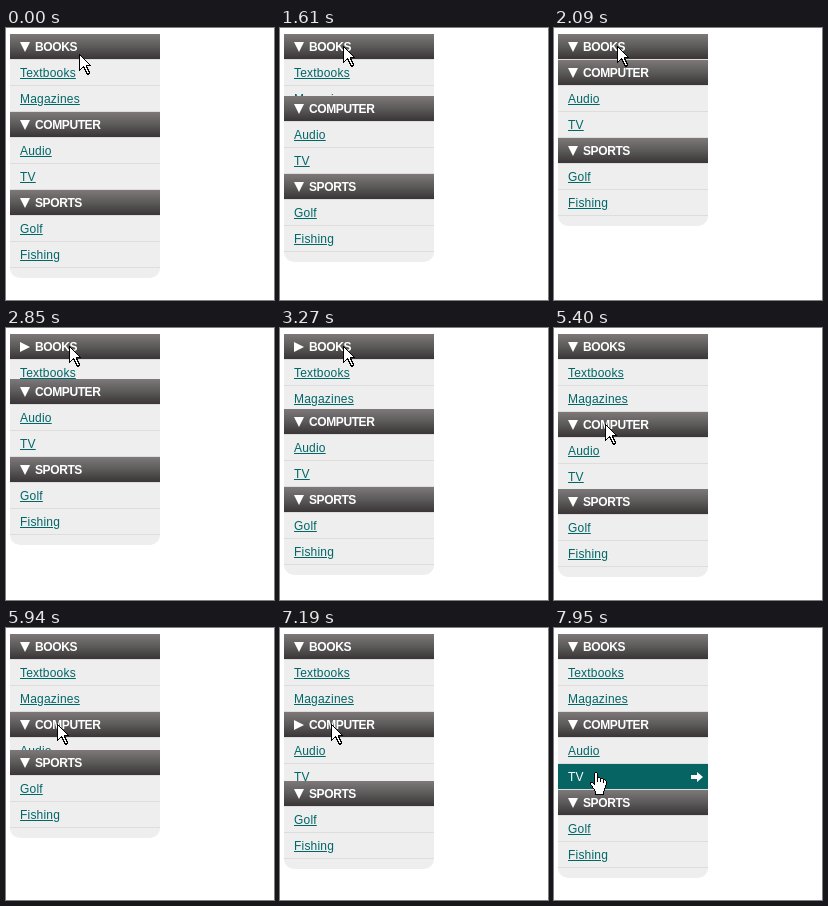
Recreate the animation shown at these times as an HTML page. Size 268 by 272 pixels, loop 8000 ms.

```html
<!DOCTYPE html>
<html lang="en">
<head>
<meta charset="utf-8">
<title>Accordion menu</title>
<style>
html, body { margin: 0; width: 100%; height: 100%; overflow: hidden; background: #fff; }
#menu {
  position: absolute; left: 4px; top: 6px; width: 150px; padding-bottom: 10px;
  background: #eee; border-radius: 0 0 10px 10px;
  font: 12px/26px "Liberation Sans", Arial, sans-serif;
}
.head {
  position: relative; height: 25px; padding-left: 25px; color: #fff;
  border-bottom: 1px solid #ddd;
  font-weight: bold; letter-spacing: -.4px;
  background: linear-gradient(#7e7879, #5c5a5a 50%, #3a3536) padding-box;
}
.head i {
  position: absolute; left: 10px; top: 8px; width: 10px; height: 10px;
  background: #fff; clip-path: polygon(0 0, 100% 0, 50% 100%);
}
.closed i { clip-path: polygon(0 0, 100% 50%, 0 100%); }
.list { height: 52px; overflow: hidden; }
.row {
  position: relative; height: 25px; padding-left: 10px;
  border-bottom: 1px solid #ddd; color: #066;
}
.row span { text-decoration: underline; text-underline-offset: 1px; letter-spacing: .2px; }
.row i {
  display: none; position: absolute; left: 133px; top: 8px; width: 12px; height: 10px; background: #fff;
  clip-path: polygon(0 30%, 50% 30%, 50% 0, 100% 50%, 50% 100%, 50% 70%, 0 70%);
}
.row.on { background: #066462; color: #fff; }
.on span { text-decoration: none; }
.on i { display: block; }
svg {
  position: absolute; left: 0; top: 0; width: 18px; height: 23px;
  fill: #fff; stroke: #000; shape-rendering: crispEdges;
}
</style>
</head>
<body>
<div id="menu"></div>
<svg id="arrow"><path d="M.5.5V16.5L4.5 12.5 8.5 20.5H9.5L10.5 18.5 7.5 12.5V11.5H11.5Z"/></svg>
<svg id="hand"><path d="M4.5 12.5V1.5l1-1h1l1 1v4h2l1 1h2l1 1h1l2 2v3l-1 1v2l-1 1v2l-1 1v3h-8v-3l-4-6-1-1v-2h2z"/><path fill="none" d="M7.5 5v5M10.5 6v4M13.5 7v4"/></svg>
<script>
const LOOP = 8000, STEP = 60, LIST = 52, SLIDE = 710;
const sections = [
  ["BOOKS", "Textbooks", "Magazines"],
  ["COMPUTER", "Audio", "TV"],
  ["SPORTS", "Golf", "Fishing"]
];
// section, first step, time already slid by then, end, opening
const slides = [
  [0, 1430, 38, 2150, false],
  [0, 2610, 19, 3330, true],
  [1, 5400, 6, 6120, false],
  [1, 6650, 47, 7510, true]
];
// first step, number of steps, pointer position reached
const moves = [
  [530, 2, 82, 18],
  [790, 4, 63, 18],
  [3530, 5, 59, 43],
  [4030, 3, 55, 57],
  [4210, 4, 54, 68],
  [4720, 9, 51, 96],
  [7710, 5, 41, 144]
];

const $ = id => document.getElementById(id);
$("menu").innerHTML = sections.map(([title, ...items]) =>
  `<div class="head"><i></i>${title}</div><div class="list">` +
  items.map(s => `<div class="row"><span>${s}</span><i></i></div>`).join("") +
  "</div>").join("");
const all = name => [...document.querySelectorAll(name)];
const heads = all(".head"), lists = all(".list"), rows = all(".row");

function sectionAt(index, t) {
  let height = LIST, closed = false;
  for (const [section, first, lead, end, opening] of slides) {
    if (section !== index || t < first) continue;
    const done = t >= end;
    const slid = Math.floor((t - first) / STEP) * STEP + lead;
    const p = done ? 1 : Math.min(slid / SLIDE, .99);
    height = Math.floor(LIST * (opening ? p : 1 - p) + .1);
    closed = opening !== done;
  }
  return { height, closed };
}

function pointerAt(t) {
  let x = 73, y = 26;
  for (const [first, steps, toX, toY] of moves) {
    if (t < first) break;
    const u = Math.min(1, (Math.floor((t - first) / STEP) + 1) / steps);
    x += (toX - x) * u;
    y += (toY - y) * u;
  }
  return [Math.round(x), Math.round(y)];
}

function draw(t) {
  heads.forEach((head, i) => {
    const { height, closed } = sectionAt(i, t);
    head.classList.toggle("closed", closed);
    lists[i].style.height = height + "px";
  });

  const [x, y] = pointerAt(t);
  rows.forEach((row, i) => {
    const top = 32 + 78 * (i >> 1) + 26 * (i % 2);
    row.classList.toggle("on", y >= top && y < top + 25);
  });
  const onList = y >= 32 && (y - 6) % 78 >= 26;
  $("arrow").style.display = onList ? "none" : "block";
  $("hand").style.display = onList ? "block" : "none";
  $("arrow").style.transform = `translate(${x}px, ${y}px)`;
  $("hand").style.transform = `translate(${x - 5}px, ${y}px)`;
}

const start = performance.now();
function tick() {
  draw((performance.now() - start) % LOOP);
  requestAnimationFrame(tick);
}
tick();
</script>
</body>
</html>
```
